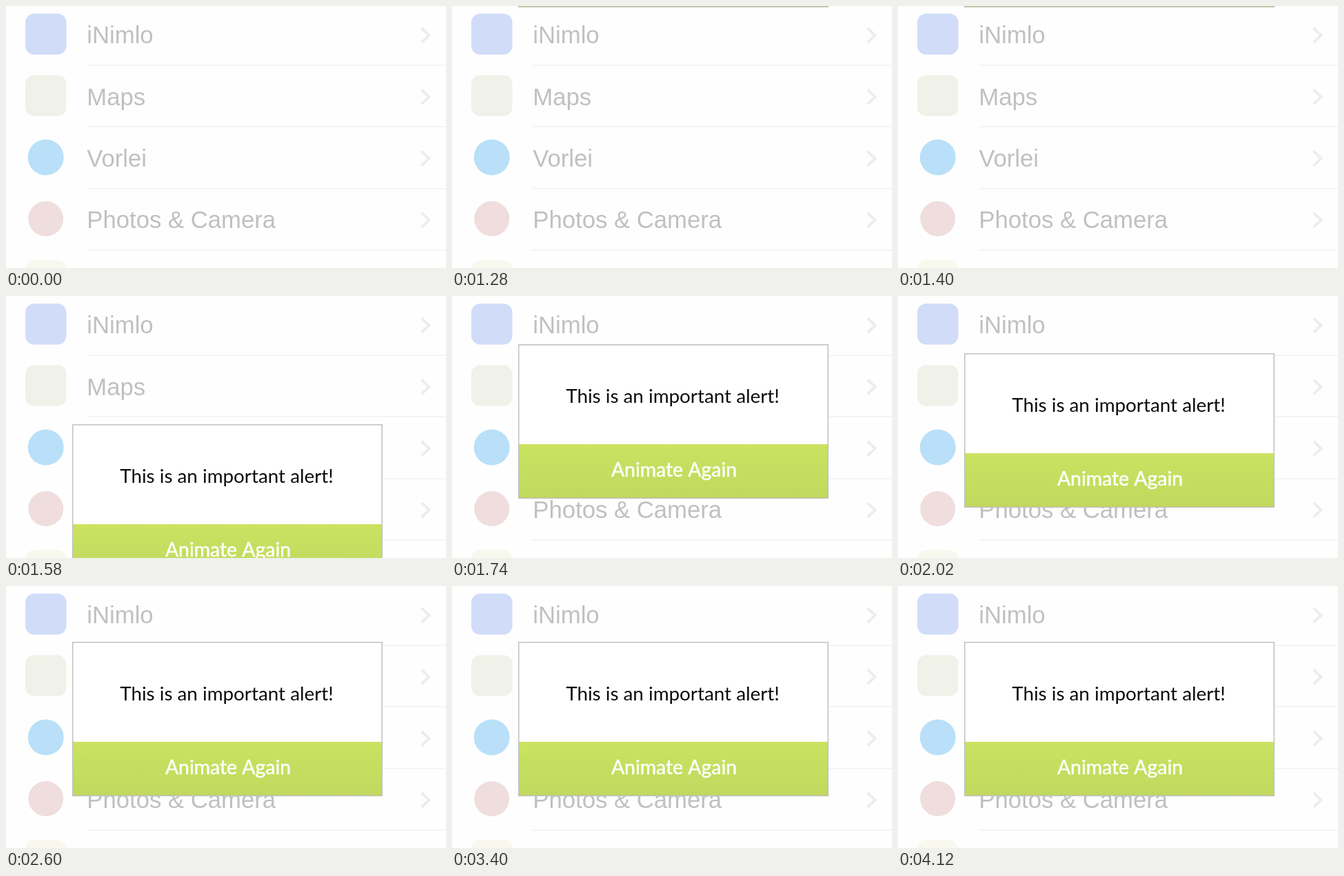
Recreate the animation shown at these times as an HTML page with a canvas. Size 638 by 380 pixels, loop 4.14 s.

```html
<!DOCTYPE html>
<html lang="en">
<head>
<meta charset="utf-8">
<title>Alert drop</title>
<style>
  html, body { margin: 0; width: 100%; height: 100%; overflow: hidden; background: #fefefe; }
  canvas { display: block; }
</style>
</head>
<body>
<canvas id="stage" width="638" height="380"></canvas>
<script>
const ctx = document.getElementById('stage').getContext('2d');
const W = 638, H = 380, LOOP = 4140, STEP = 20;
const ROW = 89.3;
const ROWS = ['iNimlo', 'Maps', 'Vorlei', 'Photos & Camera'];
const LIST_FONT = '34.7px "Liberation Sans", Arial, sans-serif';
const ALERT_FONT = '27.8px Lato, "Open Sans", sans-serif';
const BUTTON_FONT = '28.4px Lato, "Open Sans", sans-serif';

const BOX = { x: 96, y: 81, w: 450, h: 224, split: 145 };
// The alert waits just above the stage from ENTER, then a damped spring lets go
const ENTER = 1280, RELEASE = 1433;
const SPRING = { reach: 303, freq: 25.4, damp: 7.1 };

function offsetAt(t) {
  const { reach, freq, damp } = SPRING;
  const s = Math.max(0, t - RELEASE) / 1000;
  const wave = Math.cos(freq * s) + damp / freq * Math.sin(freq * s);
  return -reach * Math.exp(-damp * s) * wave;
}

function tile(y, color) {
  ctx.fillStyle = color;
  ctx.beginPath();
  ctx.roundRect(28, y, 59.5, 59.5, 13);
  ctx.fill();
}

function disc(y, r, color) {
  ctx.fillStyle = color;
  ctx.beginPath();
  ctx.arc(57.7, y, r, 0, Math.PI * 2);
  ctx.fill();
}

function chevron(y) {
  ctx.strokeStyle = '#ededee';
  ctx.lineWidth = 4;
  ctx.beginPath();
  ctx.moveTo(602.5, y - 10.5);
  ctx.lineTo(613.5, y);
  ctx.lineTo(602.5, y + 10.5);
  ctx.stroke();
}

function drawList() {
  ctx.fillStyle = '#fefefe';
  ctx.fillRect(0, 0, W, H);

  tile(11, '#d1dcf9');
  tile(100.3, '#f0f1e8');
  disc(219.5, 26, '#b9e0f8');
  disc(308.5, 25.5, '#efdedd');
  tile(368.5, '#f8f8ee');

  ctx.font = LIST_FONT;
  ctx.textAlign = 'left';
  ROWS.forEach((label, i) => {
    const y = i * ROW;
    ctx.fillStyle = '#c0c0c0';
    ctx.fillText(label, 117.3, 54.4 + y);
    ctx.fillStyle = '#f4f4f4';
    ctx.fillRect(117, Math.round(85 + y), W - 117, 2);
    chevron(42.5 + y);
  });
}

function drawAlert(shift) {
  const { x, w, h, split } = BOX, y = BOX.y + shift, mid = x + w / 2;
  ctx.fillStyle = '#ffffff';
  ctx.fillRect(x, y, w, h);

  const green = ctx.createLinearGradient(0, y + split, 0, y + h);
  green.addColorStop(0, '#cbe361');
  green.addColorStop(1, '#c0d85e');
  ctx.fillStyle = green;
  ctx.fillRect(x, y + split, w, h - split);

  ctx.strokeStyle = '#c0c1bd';
  ctx.lineWidth = 1.5;
  ctx.strokeRect(x + 0.75, y + 0.75, w - 1.5, h - 1.5);

  ctx.font = ALERT_FONT;
  ctx.textAlign = 'center';
  ctx.fillStyle = '#0c0c0c';
  ctx.fillText('This is an important alert!', mid - 1, y + 85);

  ctx.font = BUTTON_FONT;
  ctx.fillStyle = ctx.strokeStyle = '#ffffff';
  ctx.lineWidth = 0.5;
  ctx.fillText('Animate Again', mid + 1, y + 192);
  ctx.strokeText('Animate Again', mid + 1, y + 192);
}

function draw(now) {
  const t = Math.floor((now % LOOP) / STEP) * STEP;
  drawList();
  if (t >= ENTER) drawAlert(Math.round(offsetAt(t)));
}

const start = performance.now();
function tick() {
  draw(performance.now() - start);
  requestAnimationFrame(tick);
}
tick();
</script>
</body>
</html>
```
